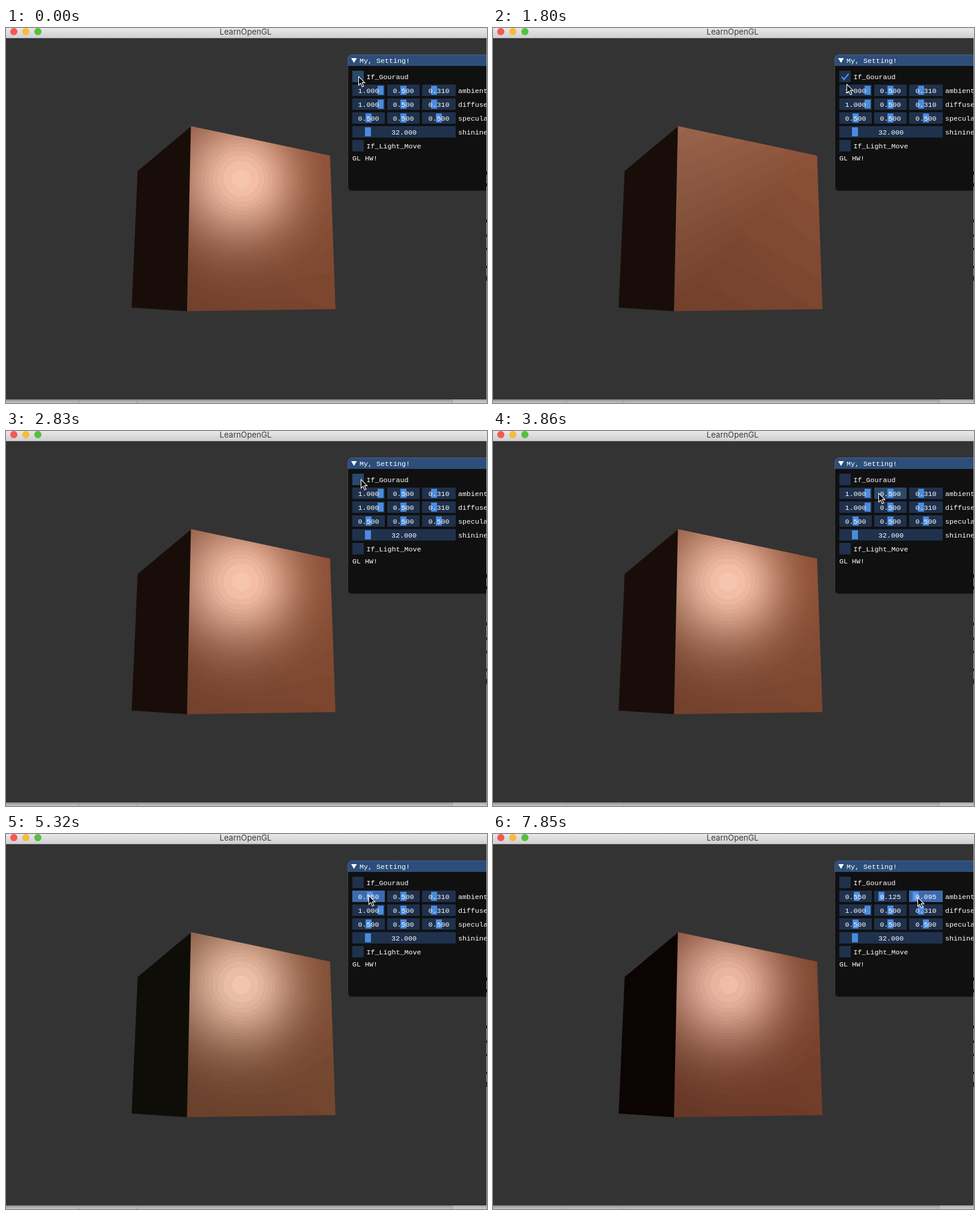
Write an HTML page with a canvas that moves like this. It is 800x623 px and loops after 8000 ms.

```html
<!DOCTYPE html>
<html lang="en">
<head>
<meta charset="utf-8">
<title>Lighting demo</title>
<style>
  html, body { margin: 0; width: 100%; height: 100%; overflow: hidden; background: #333; }
  svg, canvas { position: absolute; left: 0; top: 0; }
  canvas { left: 300px; top: 160px;
    clip-path: polygon(7.5px 3px, 239px 52px, 248px 307px, 1px 310.5px); }
  .ui { font: 11.667px "Liberation Mono", monospace; fill: #fff; }
</style>
</head>
<body>
<svg width="800" height="623">
  <path id="side" d="M219 237.500 308.500 163 302 470.500 209 464.500Z"/>
</svg>
<canvas id="face" width="250" height="312"></canvas>
<svg width="800" height="623">
  <defs>
    <linearGradient id="bar" x2="0" y2="1"><stop stop-color="#e9e7e9"/><stop offset="1" stop-color="#d1cfd1"/></linearGradient>
    <linearGradient id="shade" x2="0" y2="1"><stop stop-color="#8c8c8c"/><stop offset="1" stop-color="#c8c8c8"/></linearGradient>
    <clipPath id="panel"><rect x="568" y="44" width="250" height="227.500" rx="7"/></clipPath>
  </defs>
  <rect width="800" height="16" fill="url(#bar)"/>
  <rect y="16" width="800" height="1" fill="#b4b2b4"/>
  <circle cx="13" cy="6" r="6" fill="#f25a52"/>
  <circle cx="33" cy="6" r="6" fill="#f6bc3b"/>
  <circle cx="53" cy="6" r="6" fill="#54c13d"/>
  <text x="398.500" y="11" text-anchor="middle" font-family="Inter, sans-serif" font-size="13.200" fill="#3c3c3c">LearnOpenGL</text>

  <g clip-path="url(#panel)">
    <rect x="568" y="44" width="240" height="228" fill="#101010"/>
    <rect x="568" y="44" width="240" height="19" fill="#2d4e7a"/>
  </g>
  <rect x="568.500" y="44.500" width="250" height="226.500" rx="7" fill="none" stroke="#6e6e80" stroke-opacity=".5"/>
  <path d="M574 50h9.500l-4.750 8z" fill="#fff"/>
  <g id="widgets" class="ui">
    <text x="588" y="58">My, Setting!</text>
    <text x="599.500" y="85">If_Gouraud</text>
    <text x="752" y="108">ambient</text>
    <text x="752" y="131">diffuse</text>
    <text x="752" y="154">specular</text>
    <text x="752" y="177">shininess</text>
    <text x="599.500" y="200">If_Light_Move</text>
    <text x="576" y="220">GL HW!</text>
  </g>
  <path id="check" d="M580 81l4 4.500 7.500-9.500" fill="none" stroke="#4b93ef" stroke-width="2.200"/>
  <rect y="617" width="800" height="6" fill="url(#shade)"/>
  <rect x="743" y="617" width="57" height="6" fill="#fff" opacity=".2"/>
  <path d="M121.500 619v4M217.500 619v4M742.500 617v6" stroke="#999"/>
  <path d="M799.500 17v606" stroke="#a8a8a8"/>
  <path d="M799.500 238v6m0 14v5m0 55v5m0 20v4m0 18v4m0 26v4m0 13v8" stroke="#111"/>
  <path id="cursor" d="M0 0V14.500L3.400 11.400 5.900 17.200 8.300 16.200 5.800 10.400H10.300Z" fill="#000" stroke="#fff" stroke-width="1.100"/>
</svg>
<script>
const $ = id => document.getElementById(id);
const IDLE = '#1f314c', HOVER = '#2a496b', ACTIVE = '#3c6bad';

// ---- widgets ----
function add(tag, attrs) {
  const el = document.createElementNS('http://www.w3.org/2000/svg', tag);
  for (const name in attrs) el.setAttribute(name, attrs[name]);
  return $('widgets').appendChild(el);
}
function slider(x, y, w, value, max = 1) {
  const box = add('rect', { x, y, width: w, height: 19 });
  const grab = add('rect', { y: y + 2, width: 10, height: 15 });
  const label = add('text', { x: x + w / 2, y: y + 14, 'text-anchor': 'middle' });
  const travel = w - 14;
  return {
    travel,
    draw(v = value, state = IDLE) {
      box.setAttribute('fill', state);
      grab.setAttribute('fill', state === ACTIVE ? '#5594ec' : '#4a8bdd');
      grab.setAttribute('x', Math.floor(x + 2.1 + travel * v / max));
      label.textContent = v.toFixed(3);
    },
    hit: (px, py) => px >= x && px < x + w && py >= y && py < y + 19
  };
}
const row = (y, values) => values.map((v, i) => slider(576 + 58 * i, y, i < 2 ? 54 : 56, v));
const ambientRow = row(94, [1, .5, .31]);
const fixed = [...row(117, [1, .5, .31]), ...row(140, [.5, .5, .5]), slider(576, 163, 172, 32, 256)];
const checkbox = add('rect', { x: 576, y: 71, width: 19, height: 19 });
add('rect', { x: 576, y: 186, width: 19, height: 19, fill: IDLE });
fixed.forEach(s => s.draw());

// ---- motion, keyed by tick ----
const path = [[0, 586, 80], [2, 586, 80], [4, 587, 78], [11, 587, 78], [12, 588, 93], [13, 589, 100],
  [14, 590, 97], [15, 590, 84], [16, 590, 80], [20, 590, 80], [22, 597, 99], [23, 606, 115], [24, 622, 114],
  [26, 641, 103], [28, 624, 102], [29, 621, 102], [36, 603, 102], [37, 606, 103], [40, 661, 103],
  [43, 661, 103], [44, 668, 102], [45, 668, 103], [49, 647, 104], [50, 664, 105], [51, 712, 105], [53, 706, 105]];
const ambientKeys = [
  [[29, 1], [36, .55]],
  [[42, .5], [44, .675], [45, .675], [49, .125]],
  [[51, .31], [53, .095]]
];
const drags = [[29, 36], [43, 49], [51, 53]];

function track(keys, t, k = 1) {
  const i = keys.findIndex(key => key[0] >= t);
  if (i < 0) return keys[keys.length - 1][k];
  if (i === 0) return keys[0][k];
  const a = keys[i - 1], b = keys[i];
  return a[k] + (b[k] - a[k]) * (t - a[0]) / (b[0] - a[0]);
}
const tickAt = ms => Math.min(53, Math.floor(ms < 1800 ? ms / 150 : 12.08 + (ms - 1800) / 147));

// ---- lighting ----
const EYE = [-1.372, -.405, 2.64], LIGHT = [1.2, 1, 3];

// Diffuse and specular terms at a point of the front face
function light(u, v) {
  const p = [u - .5, .5 - v, .5];
  const l = LIGHT.map((c, i) => c - p[i]), e = EYE.map((c, i) => c - p[i]);
  const len = Math.hypot(...l);
  const dot = -l[0] * e[0] - l[1] * e[1] + l[2] * e[2];
  return [l[2] / len, Math.max(0, dot / len / Math.hypot(...e)) ** 32];
}
const TL = light(0, 0), TR = light(1, 0), BL = light(0, 1), BR = light(1, 1);
const vertexLight = (u, v) => [0, 1].map(i => u + v < 1
  ? TL[i] + u * (TR[i] - TL[i]) + v * (BL[i] - TL[i])
  : BR[i] + (1 - u) * (BL[i] - BR[i]) + (1 - v) * (TR[i] - BR[i]));

// Inverse perspective: screen point to face coordinates
function faceCoords(x, y) {
  const a = 340.5 - .2031 * x, b = -26.7 + .0684 * x, d = 92.06 - .2031 * y, e = 274.85 + .0684 * y;
  const p = x - 308, q = y - 163, det = a * e - b * d;
  return [(p * e - b * q) / det, (a * q - p * d) / det];
}

// Brightness falls in visible bands; each pixel holds its diffuse step and its band
const BAND = .045, PEAK = .715, DIFFUSE_STEPS = 120;
const W = 250, H = 312;
function shadeMap(fn) {
  const map = new Int16Array(W * H * 2);
  for (let i = 0; i < W * H; i++) {
    const [d, s] = fn(...faceCoords(300.5 + i % W, 160.5 + Math.floor(i / W)));
    map[i * 2] = Math.round(d * DIFFUSE_STEPS);
    map[i * 2 + 1] = Math.round(Math.log(PEAK / (d / 4 + s / 2)) / BAND);
  }
  return map;
}
const phong = shadeMap(light), gouraud = shadeMap(vertexLight);

// Linear RGB into the wider display gamut
const toLinear = c => c <= .04045 ? c / 12.92 : ((c + .055) / 1.055) ** 2.4;
const toByte = c => Math.round(255 * (c <= .0031308 ? c * 12.92 : 1.055 * c ** (1 / 2.4) - .055));
function display(rgb) {
  const [r, g, b] = rgb.map(c => toLinear(Math.min(1, c)));
  return [.8225 * r + .1774 * g, .0332 * r + .9669 * g, .0171 * r + .0724 * g + .9105 * b].map(toByte);
}

const ctx = $('face').getContext('2d');
const image = ctx.createImageData(W, H);
const DIFFUSE = [1, .5, .31];
let shown = '';
function paintCube(ambient, map) {
  const key = [ambient, map === phong].join();
  if (key === shown) return;
  shown = key;
  const base = ambient.map(a => a * .1);
  $('side').setAttribute('fill', `rgb(${display(base)})`);
  const cache = new Map(), pixels = image.data;
  for (let i = 0; i < W * H; i++) {
    const step = map[i * 2], band = map[i * 2 + 1], id = step * 1000 + band;
    let c = cache.get(id);
    if (!c) {
      const d = step / DIFFUSE_STEPS, specular = PEAK * Math.exp(-band * BAND) - d / 4;
      c = display(base.map((a, k) => a + DIFFUSE[k] * d / 2 + specular));
      cache.set(id, c);
    }
    pixels[i * 4] = c[0];
    pixels[i * 4 + 1] = c[1];
    pixels[i * 4 + 2] = c[2];
    pixels[i * 4 + 3] = 255;
  }
  ctx.putImageData(image, 0, 0);
}

function render(tick) {
  const x = Math.round(track(path, tick)), y = Math.round(track(path, tick, 2));
  $('cursor').setAttribute('transform', `translate(${x + .5} ${y + .5})`);

  const pressed = tick === 6 || tick === 7 || tick === 17;
  const over = x >= 576 && x < 595 && y >= 71 && y < 90;
  checkbox.setAttribute('fill', pressed ? ACTIVE : over ? HOVER : IDLE);
  const checked = tick >= 8 && tick < 18;
  $('check').style.display = checked ? '' : 'none';

  const dragging = drags.findIndex(([from, to]) => tick >= from && tick <= to);
  const ambient = ambientRow.map((s, i) => {
    const v = Math.round(track(ambientKeys[i], tick) * s.travel) / s.travel;
    s.draw(v, dragging === i ? ACTIVE : dragging < 0 && s.hit(x, y) ? HOVER : IDLE);
    return v;
  });
  paintCube(ambient, checked ? gouraud : phong);
}

let last = -1;
const start = performance.now();
function frame() {
  const tick = tickAt((performance.now() - start) % 8000);
  if (tick !== last) render(last = tick);
  requestAnimationFrame(frame);
}
frame();
</script>
</body>
</html>
```
